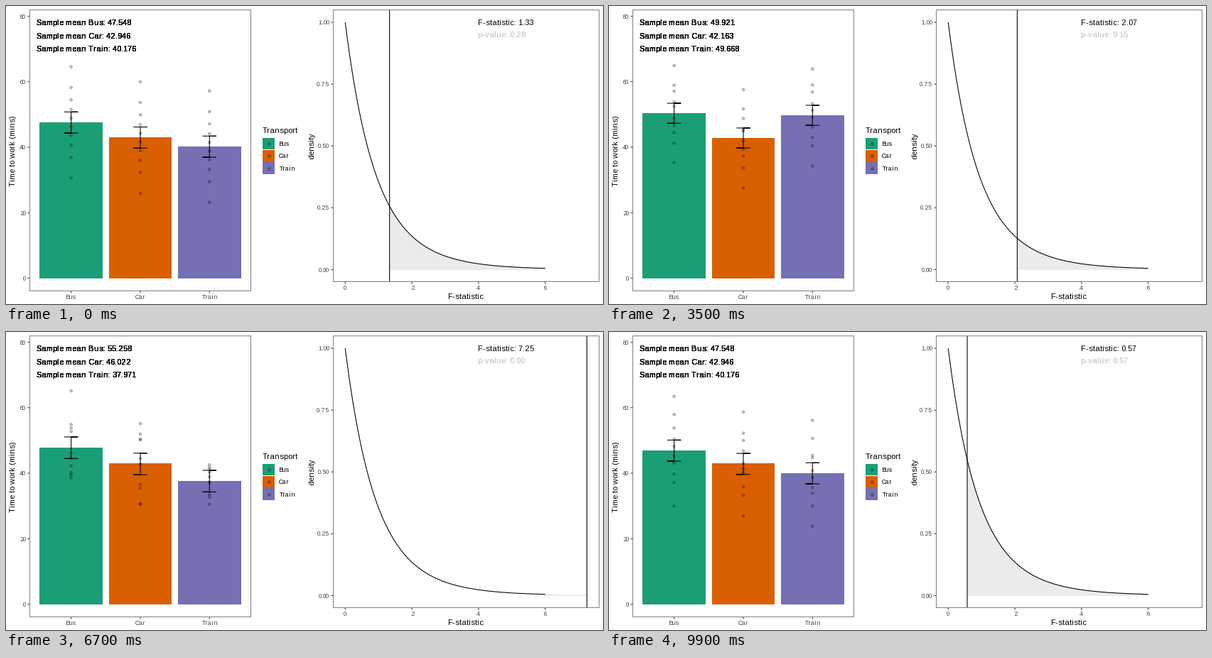
Animation of 840 by 420 pixels, one loop 10000 ms. Source, as a matplotlib script:

```python
import numpy as np
import matplotlib.pyplot as plt
from matplotlib.animation import FuncAnimation
from matplotlib.patches import Rectangle

plt.rcParams.update({
    "font.family": "Liberation Sans",
    "text.hinting_factor": 1,      # whole-pixel letter advances
    "path.snap": False,
})

W, H, DPI = 840, 420, 100
PX = 72 / DPI                      # one pixel in points
LINE = 1.07 * PX
FRAMES, STEP, MOVE = 100, 10, 8    # frames per loop, per state, per move

NAMES = ["Bus", "Car", "Train"]
FILLS = ["#1B9E77", "#D95F02", "#7570B3"]
CENTRES = [91.6, 189.0, 286.3]
COUNT = 10                         # observations per group
DOT = (0, 0, 0, 0.25)
GREY20, GREY30, BORDER = "#333333", "#4D4D4D", "#7F7F7F"

# One row per state: the three group means
MEANS = np.array([
    [47.548, 42.946, 40.176], [45.812, 44.371, 41.623],
    [43.891, 46.686, 49.249], [49.921, 42.163, 49.668],
    [57.134, 52.608, 50.877], [48.235, 51.185, 52.256],
    [55.258, 46.022, 37.971], [40.294, 39.626, 37.218],
    [39.286, 41.674, 37.582], [37.164, 41.058, 36.912]])
F_VALUES = np.array([1.33, 0.62, 0.92, 2.07, 1.24,
                     0.79, 7.25, 0.23, 0.42, 0.57])

# Pooled standard error implied by the F-statistic
ERRORS = np.sqrt(MEANS.var(axis=1, ddof=1) / F_VALUES)


def normal_scores(n):
    p = (np.arange(n) + 0.5) / n
    z = 4.91 * (p ** 0.14 - (1 - p) ** 0.14)
    return z / z.std(ddof=1)


def make_samples():
    """Normal samples, shuffled so that dots cross while they move."""
    rng = np.random.default_rng(4)
    z = np.tile(normal_scores(COUNT), (*MEANS.shape, 1))
    sd = ERRORS * COUNT ** 0.5
    return MEANS[..., None] + rng.permuted(z, axis=2) * sd[:, None, None]


SAMPLES = make_samples()


# Data to pixel scales
def mins(v):
    return 383.7 - 4.617 * np.asarray(v)


def fx(v):
    return 477.3 + 46.9 * np.asarray(v)


def fy(v):
    return 371.4 - 348.4 * np.asarray(v)


def density(f):
    return (1 + 2 * f / 27) ** -14.5


def p_value(f):
    return (1 + 2 * f / 27) ** -13.5


fig = plt.figure(figsize=(W / DPI, H / DPI), dpi=DPI, facecolor="white")
ax = fig.add_axes([0, 0, 1, 1])
ax.set_xlim(0, W)
ax.set_ylim(H, 0)
ax.axis("off")


def text(x, y, s, size, color="black", ha="left", **kw):
    return ax.text(x, y, s, fontsize=size * PX, color=color, ha=ha,
                   va="baseline", zorder=6, **kw)


def line(x, y, color="black"):
    return ax.plot(x, y, color=color, lw=LINE, zorder=4,
                   solid_capstyle="butt", solid_joinstyle="miter")[0]


def dots(x, y):
    return ax.scatter(x, y, s=(3.9 * PX) ** 2, facecolors=[DOT] * len(x),
                      edgecolors=[DOT] * len(x), linewidths=0.71 * PX,
                      zorder=3)


def block(x, y, w, h, color):
    return ax.add_patch(Rectangle((x, y), w, h, fc=color, lw=0, zorder=1,
                                  antialiased=False))


def panel(x0, y0, x1, y1, xticks, yticks):
    ax.add_patch(Rectangle((x0, y0), x1 - x0, y1 - y0, fill=False,
                           ec=BORDER, lw=PX, zorder=5))
    for x, s in xticks:
        line([x, x], [y1 + 0.5, y1 + 3], GREY20)
        text(x, y1 + 11.7, s, 8.8, GREY30, "center")
    for y, s in yticks:
        line([x0 - 3, x0 - 0.5], [y, y], GREY20)
        text(x0 - 5.3, y + 3.2, s, 8.8, GREY30, "right")


def side_title(x, y, s):
    text(x, y, s, 11, ha="center", rotation=90, rotation_mode="anchor")


# Left panel
panel(33.5, 5.5, 344.5, 401.5, zip(CENTRES, NAMES),
      [(mins(v), str(v)) for v in range(0, 81, 20)])
side_title(13, 203.5, "Time to work (mins)")
bars = [block(x - 43.75, 0, 87.5, 1, c) for x, c in zip(CENTRES, FILLS)]
points = dots(np.repeat(CENTRES, COUNT), np.zeros(3 * COUNT))
whiskers = [line([], []) for _ in NAMES]
# Stacked copies give the labels their heavy edges
labels = [[text(43, mins(78 - 4 * g) + 3.7, "", 11.38) for _ in range(6)]
          for g in range(3)]

# Legend
text(361, 179, "Transport", 11)
for g, (name, fill) in enumerate(zip(NAMES, FILLS)):
    y = 193.95 + 17.28 * g
    block(361.95, y - 7.95, 15.9, 15.9, fill)
    dots([369.9], [y])
    text(384, y + 3.2, name, 8.8)

# Right panel
panel(460.5, 5.5, 834.5, 388.5,
      [(fx(v), str(v)) for v in (0, 2, 4, 6)],
      [(fy(v), f"{v:.2f}") for v in (0, 0.25, 0.5, 0.75, 1)])
side_title(433, 197, "density")
text(647, 413, "F-statistic", 11, ha="center")
grid = np.linspace(0, 6, 101)
line(fx(grid), fy(density(grid)))
tail = ax.fill([0, 1, 1], [0, 0, 1], color="#EBEBEB", lw=0, zorder=1,
               antialiased=False)[0]
marker = line([0, 0], [5.5, 388.5])
f_text = text(664.3, 27, "", 11.38)
p_text = text(664.3, 44, "", 11.38, "#BEBEBE")


def cubic_in_out(t):
    return 4 * t ** 3 if t < 0.5 else 1 - 4 * (1 - t) ** 3


def draw_bars(n):
    i, k = divmod(max(n - 3, 0), STEP)
    j = (i + 1) % len(MEANS)
    e = cubic_in_out(min(k / MOVE, 1))

    def mix(table):
        return table[i] + (table[j] - table[i]) * e

    mean, error = mix(MEANS), mix(ERRORS)
    points.set_offsets(np.column_stack(
        [np.repeat(CENTRES, COUNT), mins(mix(SAMPLES)).ravel()]))
    shown = MEANS[j if e > 0.5 else i]
    for g, x in enumerate(CENTRES):
        top = mins(mean[g])
        bars[g].set_y(top)
        bars[g].set_height(mins(0) - top)
        hi, lo = mins(mean[g] + error), mins(mean[g] - error)
        whiskers[g].set_data([x - 9.7, x + 9.7, x, x, x - 9.7, x + 9.7],
                             [hi, hi, hi, lo, lo, lo])
        for copy in labels[g]:
            copy.set_text(f"Sample mean {NAMES[g]}: {shown[g]:.3f}")


def draw_test(n):
    f = F_VALUES[n // STEP]
    x = np.linspace(f, 6, 80)
    xs = np.concatenate([x, x[::-1]])
    ys = np.concatenate([density(x), np.zeros_like(x)])
    tail.set_xy(np.column_stack([fx(xs), fy(ys)]))
    marker.set_xdata([fx(f), fx(f)])
    f_text.set_text(f"F-statistic: {f:.2f}")
    p_text.set_text(f"p-value: {p_value(f):.2f}")


def update(n):
    draw_bars(n)
    draw_test(n)
    return []


anim = FuncAnimation(fig, update, frames=FRAMES, interval=100,
                     repeat=True, repeat_delay=0, blit=False)
plt.show()
```
